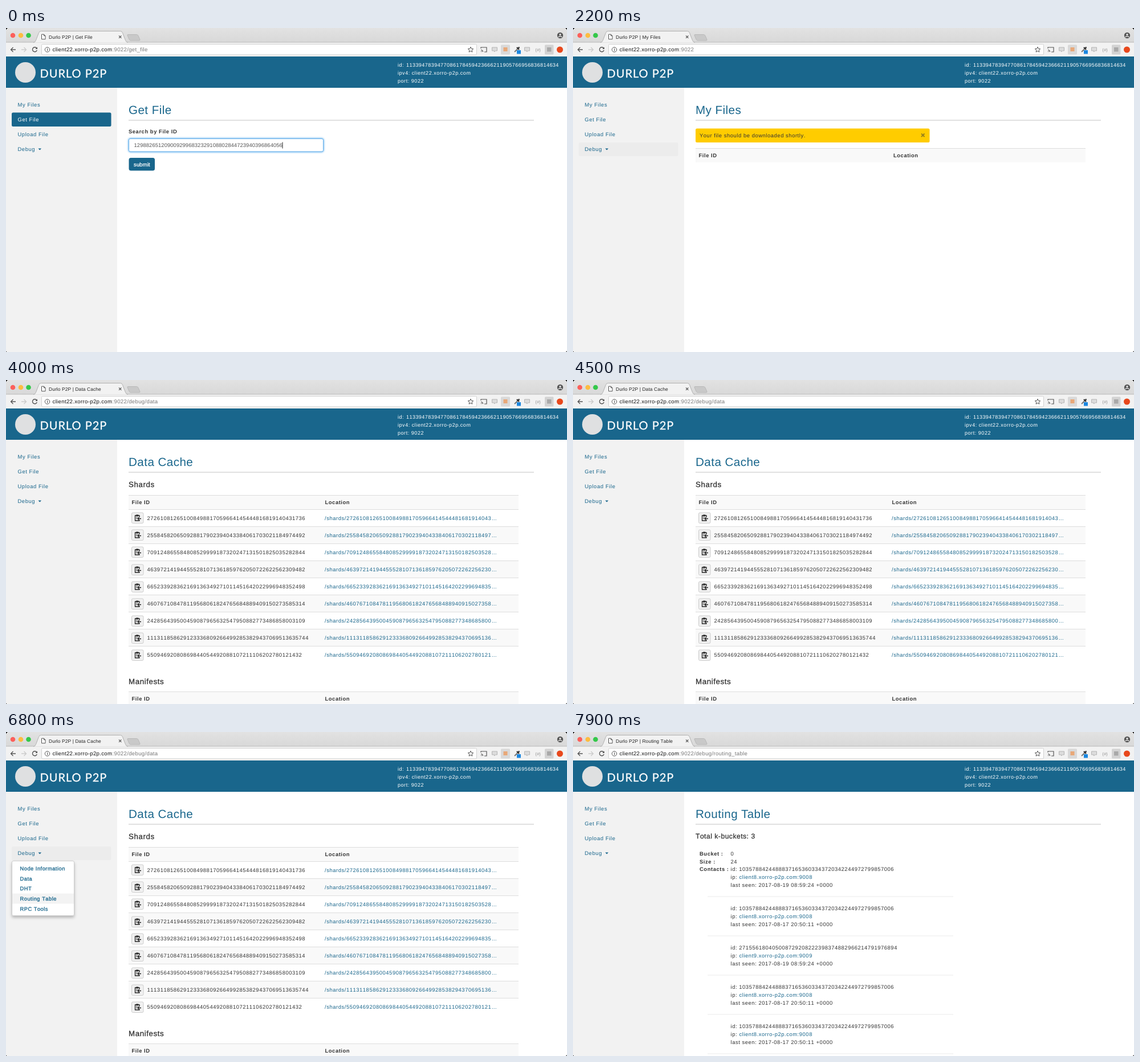
Animation, 984 px wide and 569 px high, one loop 8 s. Source, as an HTML page:

```html
<!DOCTYPE html>
<html lang="en">
<head>
<meta charset="utf-8">
<title>File sharing demo</title>
<style>
html, body { margin: 0; width: 100%; height: 100%; overflow: hidden; background: #000; }
svg { display: block; border-radius: 5px 5px 3px 3px; background: #fff; }
text { font-family: "Liberation Sans", Arial, sans-serif; font-kerning: none; white-space: pre; text-rendering: geometricPrecision; }
.heading { font-kerning: normal; }
.brand { font: 20px Lato, sans-serif; letter-spacing: 1px; }
</style>
</head>
<body>
<svg id="stage" width="984" height="569" viewBox="0 0 984 569"></svg>
<script>
const BLUE = '#19668c', INK = '#333', LOOP = 8000;
const stage = document.getElementById('stage');

// Text placed by its left edge and the middle of its capitals; a thin stroke gives medium weight.
function text(x, mid, str, { size = 9.4, gap = 0.57, fill = INK, medium = false, more = '' } = {}) {
  const stroke = medium ? `stroke="${fill}" stroke-width=".3"` : '';
  return `<text x="${x}" y="${mid + size * 0.36}" font-size="${size}" letter-spacing="${gap}" fill="${fill}" ${stroke} ${more}>${str}</text>`;
}
const bold = (x, mid, str) => text(x, mid, str, { more: 'font-weight="700"' });
const link = (x, mid, str) => text(x, mid, str, { fill: BLUE });
const rect = (x, y, w, h, fill, more = '') =>
  `<rect x="${x}" y="${y}" width="${w}" height="${h}" fill="${fill}" ${more}/>`;
const circle = (x, y, r, fill, more = '') =>
  `<circle cx="${x}" cy="${y}" r="${r}" fill="${fill}" ${more}/>`;
const path = (d, stroke, width = 1.2, fill = 'none') =>
  `<path d="${d}" stroke="${stroke}" stroke-width="${width}" fill="${fill}"/>`;
const rule = (x, y, w, fill = '#ddd') => rect(x, y, w, 1, fill);

const defs = `<defs>
  <linearGradient id="bar" x2="0" y2="1"><stop stop-color="#e2e2e2"/><stop offset="1" stop-color="#d8d8d8"/></linearGradient>
  <filter id="glow" x="-20%" y="-60%" width="140%" height="220%"><feGaussianBlur stdDeviation="1.6"/></filter>
  <filter id="shade" x="-20%" y="-20%" width="140%" height="150%"><feDropShadow dx="0" dy="3" stdDeviation="2.5" flood-opacity=".25"/></filter>
</defs>`;

function toolIcons() {
  const bubble = x => path(`M${x - 4.5} 34h9v6h-3l-2 2v-2h-4z`, '#b5b5b5', 1, '#dcdcdc');
  return path('M815 33.2l1.4 3.1 3.3.4-2.5 2.2.7 3.3-2.9-1.7-2.9 1.7.7-3.3-2.5-2.2 3.3-.4z', '#555', 1) +
    path('M833 36v-2h10v8h-4M833 38.5a3.5 3.5 0 0 1 3.5 3.5M833 41a1 1 0 0 1 1 1', '#555') +
    bubble(857) +
    rect(868, 29.5, 16, 17, '#d9d9d9', 'rx="1.5"') + rect(872.5, 34, 7, 7, '#e8a878') +
    path('M892 42l6-6', '#777', 2) + path('M896 34l4 4M898.5 35.5l2-2', '#333', 2.4) +
    rect(896, 39, 7, 6.5, '#1b87e0') +
    bubble(914) + text(928.5, 38, '{#}', { size: 7, gap: 0.3, fill: '#888' }) +
    rect(945, 29.5, 15.5, 17, '#d3d3d3', 'rx="1.5"') + rect(949, 34, 7.5, 7.5, '#a9a9a9') +
    circle(971.5, 38, 5.5, '#e8481c');
}

const browser = rect(0, 0, 984, 26, 'url(#bar)') + rect(0, 25, 984, 26, '#f2f2f2') + rule(0, 24.5, 984, '#b9b9b9') +
  [['#fc605b', 12], ['#fdbc40', 26], ['#34c84a', 39.5]].map(([c, x]) => circle(x, 13, 4.3, c)).join('') +
  path('M48 25.5q3 0 4.5-4l5-13q1-3 4-3h139q3 0 4 3l5 13q1.5 4 4.5 4', '#b0b0b0', 1, '#f2f2f2') +
  path('M214 11.5h15q2 0 3 2l3 7q.5 1.5-2 1.5h-14q-2 0-3-2l-3-7q-.5-1.5 1-1.5z', '#b3b3b3', 0.8, '#c9c9c9') +
  path('M198 13.5l4.4 4.4m0-4.4l-4.4 4.4', '#555', 1.1) +
  circle(972, 13, 5.2, '#555') + circle(972, 11.5, 1.7, '#ddd') + path('M968.8 15.8q3.2-2.6 6.4 0', '#ddd', 1.5) +
  path('M17 38H8.5m4-4l-4 4 4 4', '#555', 1.3) + path('M27 38h8.5m-4-4l4 4-4 4', '#ccc', 1.3) +
  rect(62.5, 28.5, 763, 18.5, '#fff', 'rx="2" stroke="#d0d0d0"') +
  circle(72.5, 38, 4.2, 'none', 'stroke="#555"') + rect(72, 37, 1.1, 3.3, '#555') + rect(72, 35.3, 1.1, 1.1, '#555') +
  toolIcons();

const head = { size: 9, gap: 0.55, fill: '#fff' };
const header = rect(0, 50, 984, 55, BLUE) + circle(34, 78, 18, '#dfe0e1') +
  '<text class="brand" x="59.5" y="86.8" fill="#fff" stroke="#fff" stroke-width=".3">DURLO P2P</text>' +
  text(687, 65, 'id: ', head) +
  text(702, 65, '1133947839477086178459423666211905766956836814634', { ...head, gap: 0.46 }) +
  text(687, 79, 'ipv4: client22.xorro-p2p.com', head) + text(687, 92.5, 'port: 9022', head);

const heading = str =>
  text(215, 144, str, { size: 20.6, gap: 0.45, fill: BLUE, more: 'class="heading"' }) + rule(215, 161.5, 711, '#c4c4c4');

function sidebar(s) {
  const items = ['My Files', 'Get File', 'Upload File', 'Debug'];
  return rect(0, 105, 195, 464, '#f2f2f2') +
    (s.page === 'Get File' ? rect(10, 148.5, 174.5, 24.5, BLUE, 'rx="2.5"') : '') +
    (s.debug ? rect(10, 201, 174.5, 24, '#ececec', 'rx="2.5"') : '') +
    items.map((it, i) => text(20.5, 135 + 26 * i, it, { gap: 0.6, fill: it === s.page && i === 1 ? '#fff' : BLUE })).join('') +
    path('M56.5 211.5h5.6l-2.8 3z', 'none', 0, BLUE);
}

function menu(hover) {
  const items = ['Node Information', 'Data', 'DHT', 'Routing Table', 'RPC Tools'];
  return rect(10.5, 226.5, 109, 96, '#fff', 'rx="2.5" stroke="#ccc" filter="url(#shade)"') +
    items.map((it, i) => {
      const y = 239.5 + 17.7 * i;
      return (i === hover ? rect(11, y - 9, 108, 18, '#f3f3f3') : '') +
        text(24.5, y, it, { size: 9.3, gap: 0.5, fill: BLUE, medium: true });
    }).join('');
}

function getFile(s) {
  const box = (x, y, w, h, fill, on, edge) =>
    (on ? rect(x, y, w, h, 'none', 'rx="3" stroke="#5aaeef" stroke-width="2.4" filter="url(#glow)"') : '') +
    rect(x, y, w, h, fill, `rx="2.5" stroke="${on ? '#66afe9' : edge}"`);
  return heading('Get File') + bold(215, 182, 'Search by File ID') +
    box(215.5, 194.5, 341, 22.5, '#fff', !s.sent, '#c4c4c4') +
    text(224.5, 206, '1298826512090092996832329108802844723940396864056', { gap: 0.1, fill: '#555' }) +
    (s.sent ? '' : rect(484.5, 200.5, 1, 11, '#222')) +
    box(216, 228.5, 44.5, 21.5, s.sent ? '#dedede' : BLUE, s.sent, BLUE) +
    text(224, 239.5, 'submit', { gap: 0.2, fill: s.sent ? INK : '#fff', medium: true });
}

function tableHead(top, second) {
  return rect(215, top, 684, 25, '#f9f9f9') + rule(215, top, 684) +
    bold(220.5, top + 13, 'File ID') + bold(second, top + 13, 'Location');
}

const myFiles = () => heading('My Files') + rect(215, 176.5, 410.5, 24.5, '#ffcc00', 'rx="2.5"') +
  text(222, 189, 'Your file should be downloaded shortly.') +
  path('M611 185.5l5.5 5.5m0-5.5l-5.5 5.5', '#96801f', 1.8) + tableHead(211, 562);

const shards = [
  '272610812651008498817059664145444816819140431736',
  '255845820650928817902394043384061703021184974492',
  '709124865584808529999187320247131501825035282844',
  '463972141944555281071361859762050722622562309482',
  '665233928362169136349271011451642022996948352498',
  '460767108478119568061824765684889409150273585314',
  '242856439500459087965632547950882773486858003109',
  '1113118586291233368092664992853829437069513635744',
  '55094692080869844054492088107211106202780121432'
];

function copyButton(y) {
  return rect(220.5, y - 9, 20.5, 18.5, '#f1f1f1', 'rx="2" stroke="#ccc"') +
    path(`M234 ${y - 1}v-3h-7.5v9h7.5v-1.5`, '#222', 1.3) + rect(228.2, y - 5.5, 4, 2.8, '#222') +
    path(`M237 ${y + 1.5}h-6m2.5-2.5l-2.5 2.5 2.5 2.5`, '#222', 1.3) + path(`M228 ${y - 1}h3M228 ${y + 1.5}h2`, '#222', 0.9);
}

function dataCache() {
  const title = { size: 13.3, gap: 0.6, medium: true };
  return heading('Data Cache') + text(215, 183.5, 'Shards', title) + tableHead(202, 559.5) +
    shards.map((id, i) => {
      const y = 242.2 + 30.1 * i, top = Math.floor(y - 15.1);
      return (i % 2 ? rect(215, top, 684, 30, '#f9f9f9') : '') + rule(215, top, 684) + copyButton(Math.round(y)) +
        text(247.5, y, id) + link(559, y, `/shards/${id.slice(0, 44)}…`);
    }).join('') +
    text(215, 529.5, 'Manifests', title) + tableHead(547, 559.5);
}

function routingTable() {
  const near = ['10357884244888371653603343720342244972799857006', 8];
  const far = ['271556180405008729208222398374882966214791976894', 9];
  const fresh = '2017-08-19 08:59:24', old = '2017-08-17 20:50:11';
  const contacts = [[near, fresh], [near, old], [far, fresh], [near, old], [near, old]];
  return heading('Routing Table') + text(215, 183, 'Total k-buckets: 3', { size: 12, gap: 0.55, medium: true }) +
    ['Bucket :', 'Size :', 'Contacts :'].map((s, i) => bold(222, 213.5 + 13.7 * i, s)).join('') +
    text(276.5, 213.5, '0') + text(276.5, 227.2, '24') +
    contacts.map(([[id, n], seen], i) => {
      const y = 241 + 69 * i;
      return text(276.5, y, 'id: ' + id) + text(276.5, y + 13.7, 'ip:') +
        link(291.5, y + 13.7, `client${n}.xorro-p2p.com:900${n}`) +
        text(276.5, y + 27.4, `last seen: ${seen} +0000`) + rule(236, y + 47.5, 431, '#ebebeb');
    }).join('');
}

const pages = { 'Get File': getFile, 'My Files': myFiles, 'Data Cache': dataCache, 'Routing Table': routingTable };

// Last value whose start time has been reached.
const at = (t, steps) => steps.reduce((v, [start, next]) => (t >= start ? next : v), null);

const stateAt = t => ({
  page: at(t, [[0, 'Get File'], [1700, 'My Files'], [3900, 'Data Cache'], [7400, 'Routing Table']]),
  title: at(t, [[0, 'Get File'], [1600, 'My Files'], [3900, 'Data Cache'], [7400, 'Routing Table']]),
  url: at(t, [[0, '/get_file'], [1600, ''], [3700, '/debug/data'], [7300, '/debug/routing_table']]),
  sent: t >= 1000,
  loading: t >= 1000 && t < 1700,
  debug: (t >= 2200 && t < 3100) || (t >= 6200 && t < 6900),
  menu: at(t, [[2700, -1], [2800, 0], [2900, 1], [3100, null], [6300, -1], [6500, 1], [6600, 2], [6700, 3], [6900, null]])
});

function tabAndAddress(s) {
  const small = { size: 9.6, gap: 0.33 };
  return text(75, 15.8, `Durlo P2P | ${s.title}`, { size: 8.4, gap: 0.12, fill: '#222' }) +
    (s.loading
      ? '<path id="spin" d="M66.5 11.2a4.3 4.3 0 0 1 3 7.4" stroke="#3a85d8" stroke-width="1.5" fill="none"/>' +
        path('M46.5 34l8 8m0-8l-8 8', '#555', 1.4)
      : path('M62.5 11.2h4l2.5 2.5v6h-6.5zM66.5 11.2v2.5h2.5', '#555', 1, '#fff') +
        path('M53.8 35.5a4 4 0 1 0 .5 3.5', '#555', 1.4) + path('M55 33.5v3.5h-3.5z', 'none', 0, '#555')) +
    text(81.5, 38, 'client22.xorro-p2p.com', { ...small, fill: '#111' }) +
    text(186.5, 38, ':9022' + s.url, { ...small, fill: '#777' });
}

let shown = '';
function draw() {
  const t = performance.now() % LOOP, s = stateAt(t), key = JSON.stringify(s);
  if (key !== shown) {
    shown = key;
    stage.innerHTML = defs + browser + tabAndAddress(s) + header + sidebar(s) + pages[s.page](s) +
      (s.menu === null ? '' : menu(s.menu));
  }
  if (s.loading) document.getElementById('spin').setAttribute('transform', `rotate(${(t - 1600) * 0.36} 66.5 15.5)`);
  requestAnimationFrame(draw);
}
draw();
</script>
</body>
</html>
```
